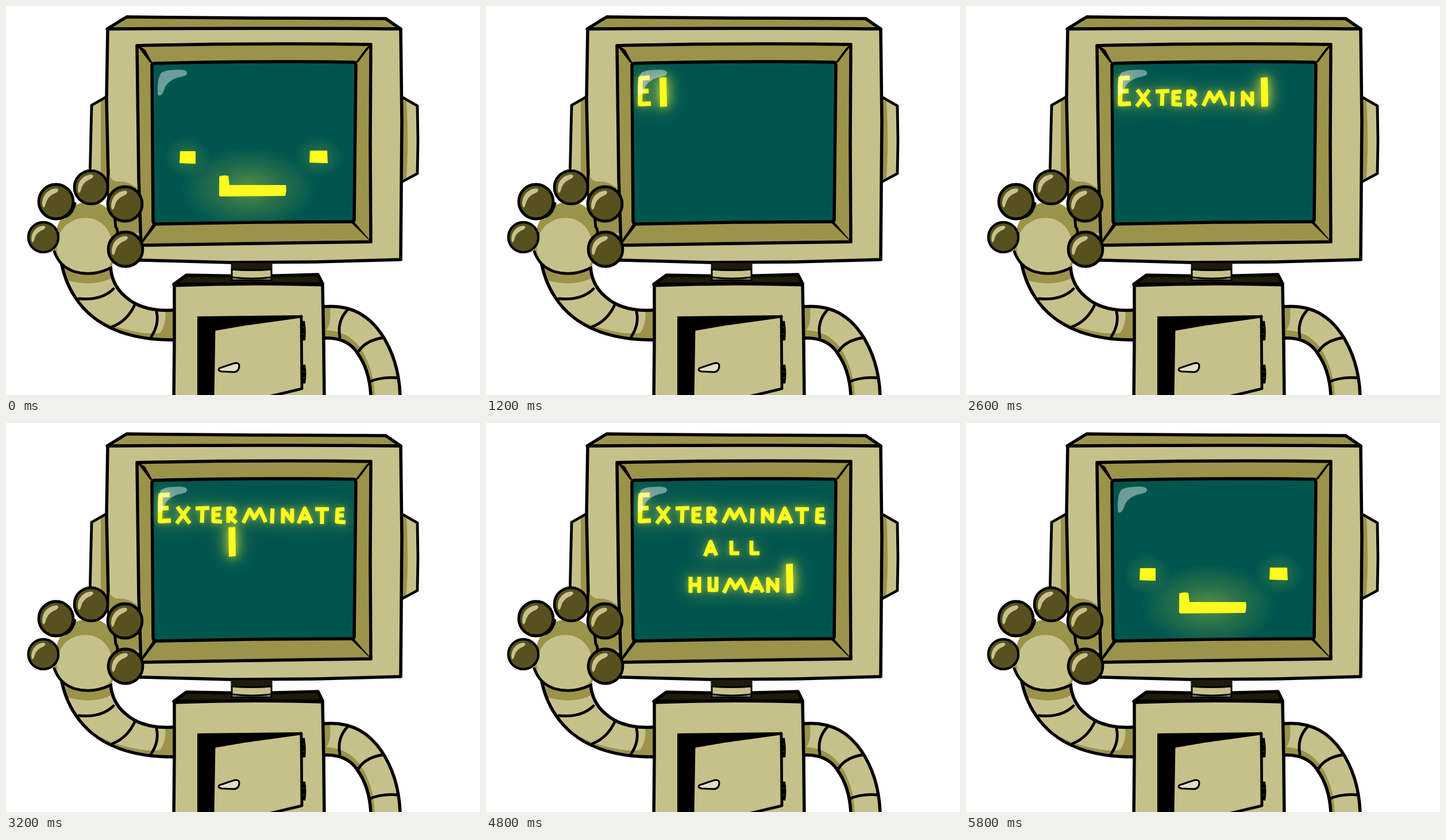
Recreate the animation shown at these times as an HTML page. Size 825 px wide and 678 px high, loop 6 s.

```html
<!DOCTYPE html>
<html lang="en">
<head>
<meta charset="utf-8">
<title>Robot typing a message</title>
<style>
html, body { margin: 0; width: 100%; height: 100%; overflow: hidden; background: #fff; }
svg { display: block; width: 100vw; height: 100vh; }
.ink { stroke: #000; stroke-width: 5.5; stroke-linejoin: round; stroke-linecap: round; }
.thin { stroke-width: 4.8; }
.fine { stroke-width: 3; }
.line { fill: none; }
.light { fill: #c6c18a; }
.mid { fill: #9c934a; }
.dark { fill: #58511f; }
.glow { filter: drop-shadow(0 0 5px #e6ee3a70) drop-shadow(0 0 14px #e6ee3a88); }
.yellow { fill: #fffb1e; }
#cursor { filter: drop-shadow(0 0 10px #e6ee3a90); }
#letters path { fill: none; stroke: #fffb1e; stroke-width: 7; stroke-linejoin: round; }
#letters path:first-child { stroke-width: 8; }
</style>
</head>
<body>
<svg viewBox="0 0 825 678" role="img" aria-label="Robot: Exterminate all humans">
<defs>
  <radialGradient id="halo">
    <stop offset="0" stop-color="#e0e838" stop-opacity=".4"/>
    <stop offset=".45" stop-color="#e0e838" stop-opacity=".19"/>
    <stop offset="1" stop-color="#e0e838" stop-opacity="0"/>
  </radialGradient>
  <path id="screenShape" d="M258 100Q420 95 605 98Q609 98 609 104L606 372Q606 376 601 376L430 377L262 380Q256 380 256 374L255 240L254 104Q254 100 258 100Z"/>
  <clipPath id="screenClip"><use href="#screenShape"/></clipPath>
</defs>

<!-- ears -->
<path class="light" d="M177 157L149 173L146 300H177Z"/>
<path class="mid" d="M177 157L165 164V300H177Z"/>
<path class="ink thin line" d="M177 157L149 173L146 300"/>
<path class="light" d="M687 158L716 174V292L687 307Z"/>
<path class="mid" d="M687 158L697 164Q701 240 697 300L687 307Z"/>
<path class="ink thin line" d="M688 158L716 174L717 235L716 292L690 306"/>

<!-- head -->
<path class="mid ink" d="M176 40L210 19L430 21L661 22L687 40Z"/>
<path class="light ink" d="M177 40Q430 38 687 40L689 200L687 442L540 446L390 447L235 443H182L178 300L175 160Z"/>
<path class="mid" d="M180 294Q184 307 198 306T228 317L234 376L231 396L194 394L178 360Z"/>
<path class="mid ink" d="M228 69Q420 64 635 67L634 240L635 411L430 414L235 417L231 300Z"/>
<path d="M226 66L242 76L256 101L250 98ZM637 66L627 73L607 100L613 98ZM234 418L238 406L257 378L264 379ZM636 412L630 404L605 375L602 379Z"/>
<use href="#screenShape" class="ink" fill="#00564f"/>

<!-- display -->
<g clip-path="url(#screenClip)">
  <g id="face">
    <ellipse cx="422" cy="318" rx="118" ry="72" fill="url(#halo)"/>
    <ellipse cx="316" cy="264" rx="40" ry="36" fill="url(#halo)" opacity=".6"/>
    <ellipse cx="544" cy="263" rx="42" ry="36" fill="url(#halo)" opacity=".6"/>
    <path class="yellow" d="M303 253L330 253V275L302 274ZM529 252H559L560 274L528 273ZM371 297Q379 294 387 296L389 312L487 312Q489 320 486 331L373 332Q370 331 371 325Z"/>
  </g>
  <g id="text" class="glow" transform="translate(0 -1)">
    <g id="letters"></g>
    <path id="cursor" class="yellow" d="M0 1L12 0L13 51L1 52Z"/>
  </g>
</g>
<path fill="#fff" opacity=".42" d="M264 151Q263 126 270 117Q277 111 300 111Q315 111 315 116Q316 121 307 123Q286 126 277 141Q273 155 268 156Q264 157 264 151Z"/>

<!-- right arm -->
<path class="light" d="M553 524Q617 518 653 571Q684 617 686 680H635Q633 634 611 604Q593 577 553 579Z"/>
<path class="mid" d="M553 524H564Q567 552 558 565Q599 567 620 601Q640 634 642 680H635Q633 634 611 604Q593 577 553 579Z"/>
<path class="ink line" d="M553 524Q617 518 653 571Q684 617 686 680M635 680Q633 634 611 604Q593 577 553 579"/>
<path class="ink thin line" d="M594 530Q576 549 581 577M658 578Q626 582 613 603M680 648Q654 646 632 655"/>

<!-- left arm -->
<path class="light" d="M95 440Q105 503 150 541Q202 583 294 582V530Q250 533 222 517Q184 494 182 454Z"/>
<path class="mid" d="M95 440L106 478Q152 491 186 473L182 454Z"/>
<path class="mid" d="M127 518Q147 541 185 557Q238 574 268 570Q280 553 277 530H294V582Q202 583 150 541Z"/>
<path class="ink line" d="M95 440Q105 503 150 541Q202 583 294 582M294 530Q250 533 222 517Q184 494 182 454"/>
<path class="ink thin line" d="M127 510Q166 514 187 493M185 559Q211 549 224 521M253 576Q267 555 262 533"/>

<!-- body -->
<path class="ink" fill="#1f1b08" d="M292 485L314 469L430 471L543 468L551 484Z"/>
<path class="light ink" d="M293 487Q420 482 551 486L553 590L554 690H292L293 580Z"/>
<path d="M333 541L516 539V555L363 566V680H333Z"/>
<path class="light ink thin" d="M362 564L420 554L514 541L515 667L440 685H360Z"/>
<path d="M513 549H520Q523 566 521 583H513ZM514 625H521Q524 642 521 658H514Z"/>
<path class="line" stroke="#4a4520" d="M515 560H520M515 572H520M516 637H521M516 648H521"/>
<path class="ink fine" fill="#dfdfcc" d="M372 631L396 623Q406 620 406 628Q405 638 396 638L375 637Q367 635 372 631Z"/>

<!-- neck -->
<path class="light ink fine" d="M393 450H462V478H393Z"/>
<path fill="#1f1b08" d="M392 448H463V459H392Z"/>
<path class="ink fine line" d="M393 459Q428 462 462 459M394 473Q428 477 461 473"/>

<!-- hand -->
<path class="mid" d="M84 428Q81 390 101 362Q119 341 150 341Q182 345 191 381L194 410Q191 455 175 461Q150 472 119 463Q95 455 84 428Z"/>
<path class="light" d="M89 431Q86 402 104 382Q123 366 147 370Q174 376 183 404Q189 452 173 461Q150 471 119 463Q98 456 89 431Z"/>
<path class="ink thin line" d="M84 428Q93 454 119 463Q151 472 181 457M105 367Q116 361 120 344M177 341Q190 360 191 385Q196 392 193 399"/>
<g id="fingers"></g>
</svg>

<script>
const NS = 'http://www.w3.org/2000/svg';
const $ = id => document.getElementById(id);
const add = (parent, tag, attrs) => {
  const el = document.createElementNS(NS, tag);
  for (const k in attrs) el.setAttribute(k, attrs[k]);
  return parent.appendChild(el);
};

const fingers = [[65, 403, 27], [87, 341, 31], [148, 316, 30], [207, 345, 31], [208, 424, 31]];
for (const [x, y, r] of fingers) {
  const g = add($('fingers'), 'g', { transform: `translate(${x} ${y}) scale(${r / 31})` });
  add(g, 'circle', { r: 30, class: 'dark ink thin' });
  add(g, 'path', { class: 'light', d: 'M-24 3Q-23 -14 -9 -21Q2 -25 4 -21Q5 -17 -5 -13Q-15 -8 -18 4Q-20 12 -23 9Z' });
}

// Each lettering stroke is paired with the left edge of the cursor that follows it.
const lines = [
  { y: 125, start: 267, glyphs: [
    ['M285 126L269 127L268 172L287 171M269 150L283 149', 302],
    ['M298 147L320 176M319 147L297 176', 336],
    ['M330 150L354 149M342 150L341 175', 369],
    ['M375 150L361 151V172L376 173M361 161H373', 390],
    ['M387 175V150H393Q399 151 398 157Q396 163 387 163L401 175', 417],
    ['M413 175L424 152L432 167L442 151L452 174', 465],
    ['M464 150L463 176', 481],
    ['M482 176V152L498 172V150', 513],
    ['M509 176L520 150L532 176M514 167H528', 546],
    ['M538 151H562M550 151V177', 573],
    ['M589 151L577 152L576 173L591 174M577 162H588', 0]] },
  { y: 182, start: 387, glyphs: [
    ['M381 233L391 208L401 232M385 224H398', 417],
    ['M427 206V228H441', 455],
    ['M462 206V228H476', 0]] },
  { y: 246, start: 362, glyphs: [
    ['M356 269V297M371 269V297M356 283H371', 391],
    ['M389 269V292H401V269', 425],
    ['M414 297L425 274L434 289L444 274L454 296', 468],
    ['M460 297L470 272L482 296M465 288H478', 498],
    ['M491 297V273L507 293V271', 522],
    ['M532 276H520V284H530V293H516', 545]] }
];

const paths = [];
const stops = [[lines[0].start, lines[0].y]];
lines.forEach((line, i) => line.glyphs.forEach(([d, next], j) => {
  paths.push(add($('letters'), 'path', { d }));
  const below = lines[i + 1];
  const wraps = below && j === line.glyphs.length - 1;
  stops.push(wraps ? [below.start, below.y] : [next, line.y]);
}));

const show = (el, on) => { el.style.display = on ? '' : 'none'; };
let last = -1;

function draw() {
  const step = Math.floor(performance.now() % 6000 / 200);
  if (step !== last) {
    last = step;
    const smiling = step < 2 || step > 28;
    const typed = Math.max(0, Math.min(paths.length, step - 5));
    const typing = step > 5 && step < 26;
    show($('face'), smiling);
    show($('text'), !smiling);
    paths.forEach((p, i) => show(p, i < typed));
    show($('cursor'), typing || step % 2);
    $('cursor').setAttribute('transform', `translate(${stops[typed]})`);
  }
  requestAnimationFrame(draw);
}
draw();
</script>
</body>
</html>
```
